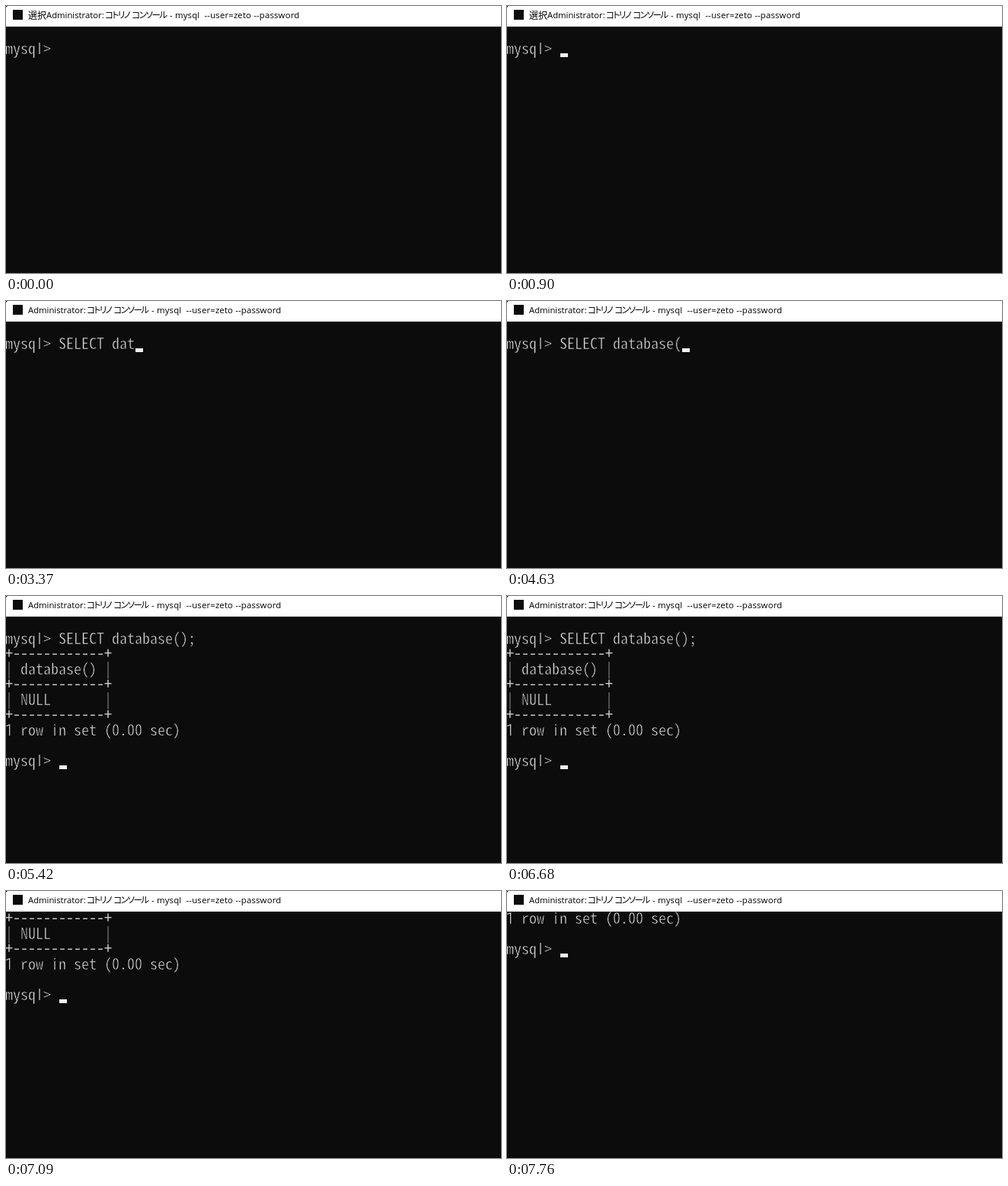
Recreate the animation shown at these times as an HTML page. Size 650x350 px, loop 8 s.

```html
<!DOCTYPE html>
<html lang="ja">
<head>
<meta charset="utf-8">
<title>Terminal</title>
<style>
  html, body { margin: 0; width: 100%; height: 100%; overflow: hidden; background: #0c0c0c; }
  svg { display: block; width: 100%; height: 100%; }
  .term { font: 20px "Noto Sans Mono CJK JP", "Noto Sans Mono", monospace; fill: #ddd;
          stroke: #0c0c0c; stroke-width: .5px; text-anchor: middle; }
  .term .thin { font-family: Roboto, sans-serif; font-weight: 300; stroke: none; }
  .term .rule { stroke: none; fill: #ccc; }
  .title { font: 11.3px "Open Sans", "Noto Sans", sans-serif; fill: #000; }
  .title text { white-space: pre; }
  .title .ja { font: 12px "Noto Sans CJK JP", "Noto Sans CJK", sans-serif; }
  .title .kana { font-size: 11.5px; font-feature-settings: "palt";
                 letter-spacing: -1.5px; word-spacing: 2px; }
  .title .tail { font-size: 11.4px; letter-spacing: .15px; }
</style>
</head>
<body>
<svg viewBox="0 0 650 350">
  <rect width="650" height="350" fill="#0c0c0c"/>
  <g class="term" id="lines"></g>
  <rect id="cursor" width="10" height="5" fill="#f2f2f2"/>
  <rect width="650" height="27" fill="#fff"/>
  <path d="M0 0h2L0 2z" fill="#222"/>
  <rect x="9" y="5" width="13" height="13" fill="#0c0c0c"/>
  <g class="title">
    <text class="ja" id="mode" x="29" y="16.5">選択</text>
    <g id="caption">
      <text x="29" y="16">Administrator:</text>
      <text class="ja kana" x="106" y="16">コトリノ コンソール</text>
      <text class="tail" x="191" y="16">- mysql  --user=zeto --password</text>
    </g>
  </g>
</svg>
<script>
const LOOP = 8000, CELL = 10, ROW = 20, TOP = 27;
const PROMPT = "mysql> ", QUERY = "SELECT database();";
const RULE = "+------------+";
const RESULT = [RULE, "| database() |", RULE, "| NULL       |", RULE,
                "1 row in set (0.00 sec)", "", PROMPT];

const keyTimes = [1230, 1430, 1700, 1830, 1960, 2360, 2760, 3050, 3100,
                  3370, 3500, 3640, 3770, 4030, 4100, 4630, 4700, 5160];
const scrollTimes = [6880, 6950, 7020, 7090, 7220, 7220, 7690];
const cursorOff = [[0, 900], [2090, 2360], [2490, 2760], [3570, 3640],
                   [6150, 6680], [7220, 7760]];
const ENTER = 5350, OUTPUT = 5420;

const el = id => document.getElementById(id);
const passed = (times, t) => times.filter(at => at <= t).length;

function lineMarkup(text, row) {
  const isRule = text === RULE;
  const y = TOP + row * ROW + (isRule ? 15 : 16);
  const cells = [...text].map((ch, i) => {
    if (ch === " ") return "";
    const thin = "il1".includes(ch) ? ' class="thin"' : "";
    const glyph = ch === ">" ? "&gt;" : ch;
    return `<tspan x="${i * CELL + CELL / 2 - 1}"${thin}>${glyph}</tspan>`;
  });
  return `<text y="${y}"${isRule ? ' class="rule"' : ""}>${cells.join("")}</text>`;
}

let shown = "";
function draw(t) {
  const typed = passed(keyTimes, t);
  const scroll = passed(scrollTimes, t);
  const lines = ["", PROMPT + QUERY.slice(0, typed)];
  if (t >= OUTPUT) lines.push(...RESULT);
  else if (t >= ENTER) lines.push("");

  const last = lines.length - 1;
  const on = !cursorOff.some(([from, to]) => t >= from && t < to);
  const state = [typed, scroll, last, on].join();
  if (state === shown) return;
  shown = state;

  el("lines").innerHTML = lines.slice(scroll).map(lineMarkup).join("");
  const cursor = el("cursor");
  cursor.setAttribute("x", lines[last].length * CELL);
  cursor.setAttribute("y", TOP + (last - scroll) * ROW + 15);
  cursor.setAttribute("visibility", on ? "visible" : "hidden");

  // The selection mark leaves the title with the first key.
  el("mode").setAttribute("visibility", typed ? "hidden" : "visible");
  el("caption").setAttribute("transform", `translate(${typed ? 0 : 24} 0)`);
}

const start = performance.now();
function tick() {
  draw((performance.now() - start) % LOOP);
  requestAnimationFrame(tick);
}
tick();
</script>
</body>
</html>
```
